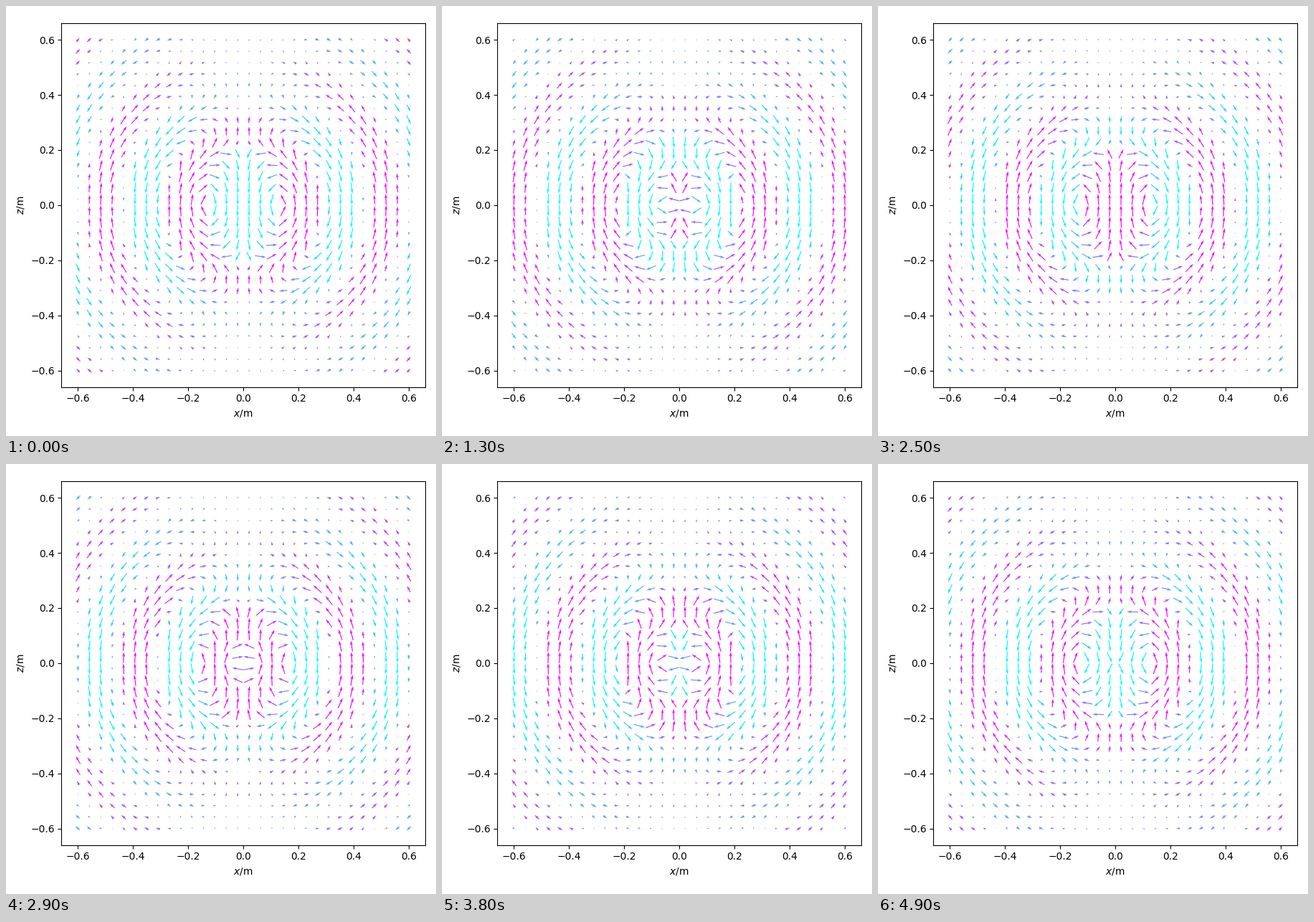
Animation of 600x600 px, one loop 5 s. Source, as a matplotlib script:

```python
import numpy as np
import matplotlib.pyplot as plt
from matplotlib.animation import FuncAnimation

FRAMES = 50
INTERVAL = 100          # ms
GRID = 30
WAVELENGTH = 0.3        # m
E_MAX = 0.073           # field strength above which arrows stop growing

k = 2 * np.pi / WAVELENGTH
axis = np.linspace(-0.6, 0.6, GRID)
x, z = np.meshgrid(axis, axis)
y = axis[GRID // 2]     # grid plane closest to the dipole

rho = np.hypot(x, y)
r = np.hypot(rho, z)
kr = k * r
sin_t, cos_t = rho / r, z / r


def dipole_field(frame):
    """Ex and Ez of a Hertzian dipole along z, limited to unit length."""
    phase = 2 * np.pi * frame / FRAMES - np.pi / 2 - kr
    c, s = np.cos(phase), np.sin(phase)
    e_r = 2 * cos_t * (c - kr * s) / kr**3
    e_t = sin_t * ((1 - kr**2) * c - kr * s) / kr**3
    ex = (e_r * sin_t + e_t * cos_t) * x / rho
    ez = e_r * cos_t - e_t * sin_t
    limit = np.maximum(np.hypot(ex, ez), E_MAX)
    return ex / limit, ez / limit


fig, ax = plt.subplots(figsize=(6, 6), dpi=100)
ex, ez = dipole_field(0)
scale = 1.8 * GRID * np.hypot(ex, ez).mean()
arrows = ax.quiver(x, z, ex, ez, ez, cmap="cool", pivot="mid",
                   scale=scale, scale_units="width")
arrows.set_clim(-1, 1)
ax.set_xlim(-0.66, 0.66)
ax.set_ylim(-0.66, 0.66)
ax.set_aspect("equal")
ax.set_xlabel("$x$/m")
ax.set_ylabel("$z$/m")
fig.tight_layout()


def update(frame):
    ex, ez = dipole_field(frame)
    arrows.set_UVC(ex, ez, ez)
    return (arrows,)


anim = FuncAnimation(fig, update, frames=FRAMES, interval=INTERVAL,
                     repeat=True, repeat_delay=0)
plt.show()
```
